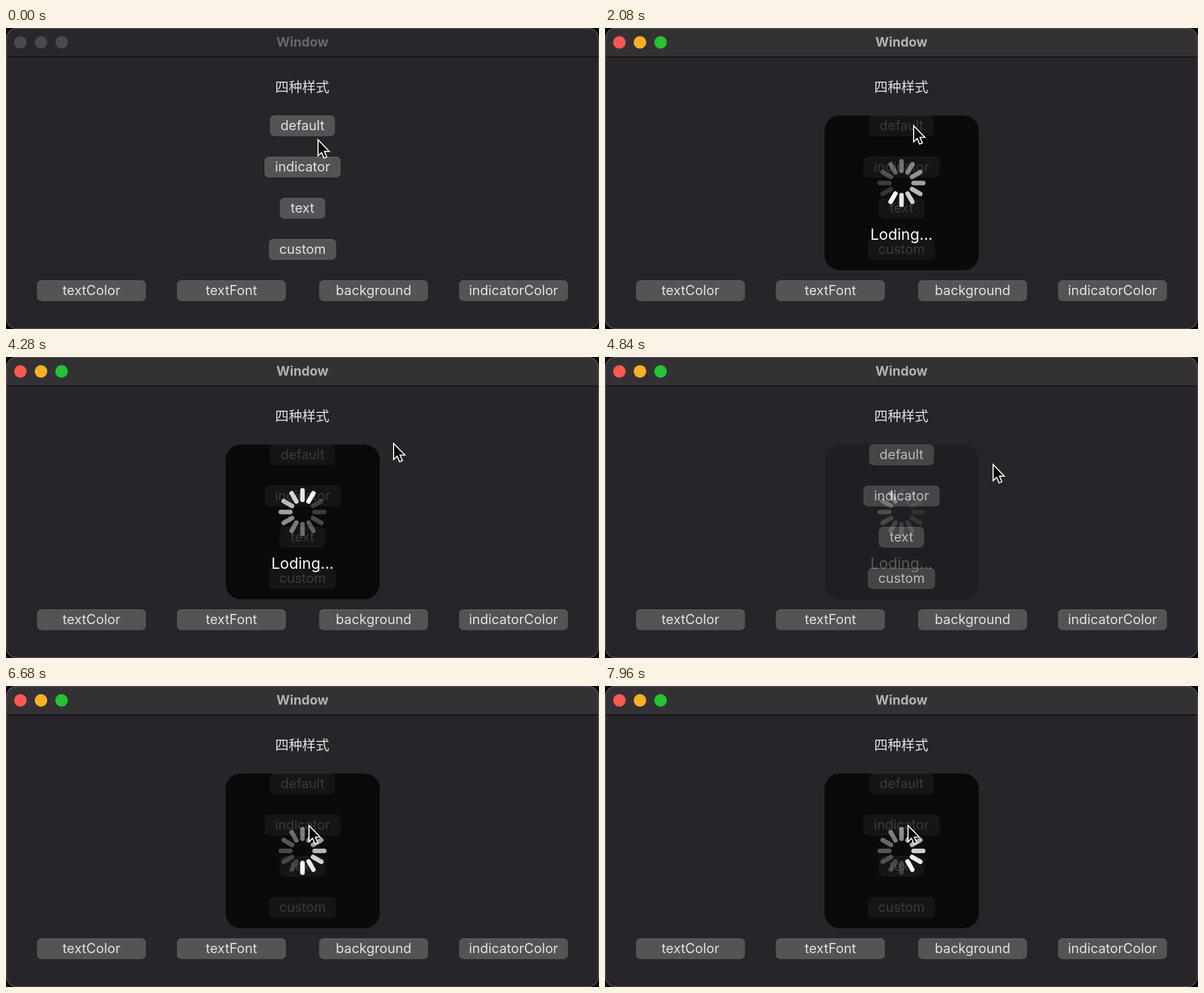
Recreate the animation shown at these times as an HTML page. Size 1051x533 px, loop 8 s.

```html
<!DOCTYPE html>
<html lang="zh">
<head>
<meta charset="utf-8">
<title>Window</title>
<style>
  html, body { margin: 0; width: 100%; height: 100%; overflow: hidden; background: #000; }
  svg { display: block; width: 1051px; height: 533px; }
  text { font: 23.7px Inter, "Open Sans", sans-serif; text-anchor: middle; fill: #e1e0e2; }
  #title { font-size: 23px; font-weight: 700; }
  #label { font: 24px "Noto Sans CJK SC", "Noto Sans CJK", sans-serif; }
  #loading { font-size: 27px; fill: #fff; }
</style>
</head>
<body>
<svg viewBox="0 0 1051 533">
  <defs>
    <clipPath id="frame"><rect width="1051" height="533" rx="19"/></clipPath>
  </defs>
  <g clip-path="url(#frame)">
    <rect width="1051" height="533" fill="#272529"/>
    <rect id="bar" width="1051" height="51"/>
    <rect y="50.5" width="1051" height="1.5" fill="#0b0a0c"/>
  </g>
  <rect x=".75" y=".5" width="1049.5" height="532" rx="18.5" fill="none" stroke="#5c5a5e" stroke-width="1.3"/>
  <g id="lights"></g>
  <text id="title" x="525.5" y="33">Window</text>
  <text id="label" x="525" y="113">四种样式</text>
  <g id="buttons"></g>
  <g id="panel">
    <rect x="389" y="155" width="273.5" height="274" rx="27" fill="#000" fill-opacity=".74"/>
    <g id="spinner" stroke="#fff" stroke-width="8" stroke-linecap="round"></g>
    <text id="loading" x="525.5" y="375">Loding...</text>
  </g>
  <path id="cursor" d="M0 0V28.5L6.3 22.6L10.6 32.6L15.6 30.4L11.4 20.6H20Z"
        fill="#000" stroke="#fff" stroke-width="1.9" stroke-linejoin="miter"/>
</svg>
<script>
const LOOP = 8000, STEP = 53.5;
const $ = id => document.getElementById(id);

function add(parent, tag, attrs, text) {
  const el = document.createElementNS("http://www.w3.org/2000/svg", tag);
  for (const key in attrs) el.setAttribute(key, attrs[key]);
  if (text) el.textContent = text;
  return parent.appendChild(el);
}

const lightColors = ["#ff5850", "#fdb024", "#26c333"];
const lights = lightColors.map((_, i) =>
  add($("lights"), "circle", { cx: 25.5 + 36.5 * i, cy: 25.5, r: 11 }));

function button(name, x, y, width) {
  const g = $("buttons"), box = { x, width, height: 36.5, rx: 8 };
  add(g, "rect", { ...box, y: y + 1, fill: "#1b1a1d" });
  add(g, "rect", { ...box, y, fill: "#6b696d" });
  add(g, "rect", { ...box, y: y + 1, height: 35.5, fill: "#555356" });
  add(g, "text", { x: x + width / 2, y: y + 26 }, name);
}
button("default", 468, 155, 115);
button("indicator", 458, 228, 135);
button("text", 485.5, 301, 80);
button("custom", 466, 374, 119);
button("textColor", 55, 447, 193);
button("textFont", 303, 447, 193);
button("background", 555, 447, 193);
button("indicatorColor", 803, 447, 193);

const blades = Array.from({ length: 12 }, (_, i) =>
  add($("spinner"), "line", { y1: -21.5, y2: -38.5, transform: `rotate(${30 * i})` }));

// time, x, y of the pointer tip
const path = [
  [0, 553, 198], [360, 560, 183], [1120, 560, 183], [1480, 547, 173],
  [2560, 547, 173], [3080, 687, 153], [4680, 687, 153], [4840, 688, 190],
  [5040, 651, 277], [5320, 580, 262], [5480, 552, 251], [5640, 537, 247], [LOOP, 537, 247]
];

const clamp = v => Math.min(1, Math.max(0, v));
const ramp = (t, from, span) => clamp((t - from) / span);

function pointer(t) {
  const i = path.findIndex(p => p[0] > t);
  const [t0, x0, y0] = path[i - 1], [t1, x1, y1] = path[i];
  const k = (t - t0) / (t1 - t0);
  return [x0 + (x1 - x0) * k, y0 + (y1 - y0) * k];
}

function draw(t) {
  const active = t >= 1640, second = t >= 5800;
  $("bar").setAttribute("fill", active ? "#343135" : "#29272b");
  $("title").style.fill = active ? "#b3b1b4" : "#69676b";
  lights.forEach((el, i) => el.setAttribute("fill", active ? lightColors[i] : "#4b494d"));

  $("panel").setAttribute("opacity", second
    ? ramp(t, 5940, 240)
    : ramp(t, 1620, 240) * (1 - ramp(t, 4640, 260)));
  $("loading").style.display = second ? "none" : "";
  $("spinner").setAttribute("transform", `translate(525.5 ${second ? 292 : 274.5})`);

  const head = Math.floor(second ? 6.03 + (t - 6680) / STEP : 7.93 + (t - 2080) / STEP);
  blades.forEach((el, i) => {
    const age = ((head - i) % 12 + 12) % 12;
    el.setAttribute("stroke-opacity", 0.18 + 0.82 * (1 - age / 11) ** 1.4);
  });

  $("cursor").setAttribute("transform", `translate(${pointer(t)})`);
}

const start = performance.now();
function tick() {
  draw((performance.now() - start) % LOOP);
  requestAnimationFrame(tick);
}
tick();
</script>
</body>
</html>
```
